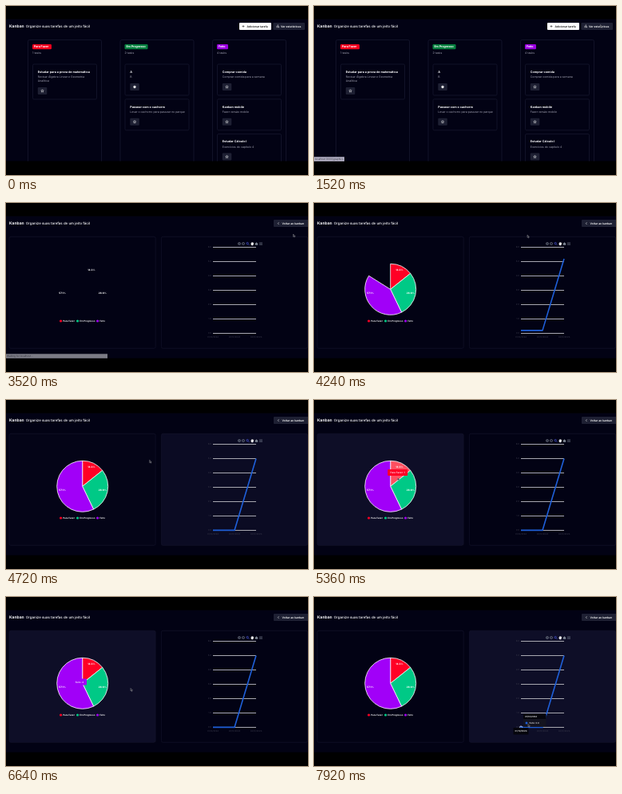
Write an HTML page that moves like this. It is 378x212 px and loops after 8 s.

```html
<!DOCTYPE html>
<html lang="pt">
<head>
<meta charset="utf-8">
<style>
html, body { margin: 0; width: 100%; height: 100%; overflow: hidden; background: #000; }
svg { display: block; width: 100vw; height: 100vh; }
text { font-family: Inter, "Open Sans", sans-serif; white-space: pre; text-rendering: geometricPrecision; }
</style>
</head>
<body>
<svg id="stage" viewBox="0 0 378 212"></svg>
<script>
const LOOP = 8000, STEP = 80;
const BG = '#020214', LIT = '#0e0e27', EDGE = '#16172e', MUTED = '#a2a2b2', DARK = '#1e2033';
const RED = '#ff0025', GREEN = '#00c986', PURPLE = '#a100f8', BLUE = '#1f5fd8', AXIS = '#3a3a4b';
const stage = document.getElementById('stage');

function add(parent, tag, attrs = {}, content) {
  const el = document.createElementNS('http://www.w3.org/2000/svg', tag);
  set(el, attrs);
  if (content !== undefined) el.textContent = content;
  parent.append(el);
  return el;
}
function set(el, attrs) {
  for (const key in attrs) el.setAttribute(key, attrs[key]);
}
const group = parent => add(parent, 'g');
const box = (p, x, y, width, height, fill, rx = 1, more = {}) =>
  add(p, 'rect', { x, y, width, height, fill, rx, ...more });
const path = (p, d, stroke, width = 0.5, fill = 'none') =>
  add(p, 'path', { d, stroke, 'stroke-width': width, fill, 'stroke-linejoin': 'round' });
const label = (p, x, y, str, size, fill = '#fff', weight = 400, anchor = 'start') =>
  add(p, 'text', { x, y, dy: '.36em', 'font-size': size, fill, 'font-weight': weight, 'text-anchor': anchor }, str);
const show = (el, on) => set(el, { opacity: +on });

const clamp = v => Math.max(0, Math.min(1, v));
const ramp = (t, from, to) => clamp((t - from) / (to - from));
const ease = v => 0.5 - Math.cos(Math.PI * v) / 2;
const within = (t, from, to) => t >= from && t < to;

box(stage, 0, 16.5, 378, 178.2, BG, 0);
label(stage, 4, 25.4, 'Kanban', 4.95, '#fff', 700);
label(stage, 24.8, 25.5, 'Organize suas tarefas de um jeito fácil', 4.42, '#fff', 500);

// Kanban board
const board = group(stage);
box(board, 292, 21, 40, 9, '#fff');
path(board, 'M295.5 25.5h3M297 24v3', '#111');
label(board, 301.5, 25.6, 'Adicionar tarefa', 3.4, '#111', 600);
box(board, 334.5, 21, 39.5, 9, DARK);
path(board, 'M339 27.2v-2.4M340.3 27.2v-3.8M341.6 27.2v-1.7', '#fff', 0.6);
label(board, 344, 25.6, 'Ver estatísticas', 3.4, '#fff', 600);

function star(p, x, y, filled) {
  const points = Array.from({ length: 10 }, (_, i) => {
    const r = i % 2 ? 0.9 : 1.8, a = i * Math.PI / 5;
    return `${x + r * Math.sin(a)} ${y - r * Math.cos(a)}`;
  });
  path(p, `M${points.join('L')}Z`, '#fff', 0.5, filled ? '#fff' : 'none');
}
function task(x, y, title, lines, starred) {
  const extra = (lines.length - 1) * 5;
  box(board, x, y, 80, 39 + extra, 'none', 1.5, { stroke: EDGE, 'stroke-width': 0.8 });
  label(board, x + 6.3, y + 9.4, title, 3.72, '#fff', 700);
  lines.forEach((line, i) => label(board, x + 6.3, y + 15.9 + i * 5, line, 3.5, MUTED));
  box(board, x + 6.3, y + 24 + extra, 11.5, 9, DARK);
  star(board, x + 12, y + 28.6 + extra, starred);
}
function column(x, name, color, width, count, tasks) {
  box(board, x, 42.5, 92, 170, 'none', 2, { stroke: EDGE, 'stroke-width': 0.8 });
  box(board, x + 5.5, 48, width, 6.2, color, 1.2);
  label(board, x + 7.4, 51.2, name, 3.6, '#fff', 700);
  label(board, x + 5.5, 58.3, `${count} tasks`, 3.5, MUTED);
  tasks.forEach((args, i) => task(x + 6, 73 + i * 43.8, ...args));
}
column(27.5, 'Para Fazer', '#f5001d', 24, 1, [
  ['Estudar para a prova de matemática', ['Revisar Álgebra Linear e Geometria', 'Analítica']]]);
column(143, 'Em Progresso', '#06803f', 29, 2, [
  ['A', ['B'], true],
  ['Passear com o cachorro', ['Levar o cachorro para passear no parque']]]);
column(258.5, 'Feito', '#9a00e0', 14, 4, [
  ['Comprar comida', ['Comprar comida para a semana']],
  ['Kanban mobile', ['Fazer versão mobile']],
  ['Estudar Cálculo I', ['Exercícios do capítulo 4']]]);
box(board, 0, 194.7, 378, 18, '#000', 0);

// Statistics page
const stats = group(stage);
box(stats, 335, 21, 44, 9, DARK);
path(stats, 'M341.6 24.2l-1.3 1.4 1.3 1.4', '#fff');
label(stats, 345.5, 25.6, 'Voltar ao kanban', 3.4, '#fff', 600);
const card = x => box(stats, x, 42.3, 183.2, 140, LIT, 2, { stroke: EDGE, 'stroke-width': 0.6 });
const leftCard = card(4), rightCard = card(194.4);

const CX = 95.7, CY = 108.3, R = 32;
const slices = [
  { name: 'Para Fazer', value: 1, color: RED, hover: '#ff4f60', dot: 68.6, width: 25 },
  { name: 'Em Progresso', value: 2, color: GREEN, hover: '#45dba6', dot: 89.6, width: 30 },
  { name: 'Feito', value: 4, color: PURPLE, hover: '#b945ff', dot: 114.6, width: 18 }];
const total = 7;
for (const s of slices) s.el = path(stats, '', '#fff', 0.8, s.color);
let sum = 0;
for (const s of slices) {
  const a = (sum + s.value / 2) / total * 2 * Math.PI;
  s.from = sum / total;
  sum += s.value;
  s.to = sum / total;
  label(stats, CX + 25.8 * Math.sin(a), CY - 25.8 * Math.cos(a) - 0.8,
    (s.value / total * 100).toFixed(1) + '%', 3.1, '#fff', 700, 'middle');
  add(stats, 'circle', { cx: s.dot, cy: 148, r: 1.6, fill: s.color });
  label(stats, s.dot + 2.6, 148, s.name, 2.9, '#fff', 600);
}
function sector(from, to) {
  if (to - from < 0.001) return '';
  const at = f => `${CX + R * Math.sin(f * 2 * Math.PI)} ${CY - R * Math.cos(f * 2 * Math.PI)}`;
  return `M${CX} ${CY}L${at(from)}A${R} ${R} 0 ${+(to - from > 0.5)} 1 ${at(to)}Z`;
}

for (let i = 0; i < 7; i++) {
  const y = 55.5 + i * 18;
  path(stats, `M259 ${y}H313`, '#a8a8b0', 1);
  label(stats, 257, y - 0.8, `${6 - i}.0`, 2.9, AXIS, 400, 'end');
}
const pointX = [259, 286, 313], dates = ['01/10/2024', '02/10/2024', '03/10/2024'];
dates.forEach((d, i) => label(stats, pointX[i], 168.4, d, 2.7, AXIS, 400, 'middle'));
for (const x of [292, 297])
  add(stats, 'circle', { cx: x, cy: 51, r: 1.6, fill: 'none', stroke: '#8b93a0', 'stroke-width': 0.5 });
path(stats, 'M290.9 51h2.2M292 49.9v2.2M295.9 51h2.2', '#8b93a0', 0.4);
add(stats, 'circle', { cx: 302.2, cy: 50.6, r: 1.2, fill: 'none', stroke: '#4a56d8', 'stroke-width': 0.7 });
path(stats, 'M303.1 51.6l1.3 1.3', '#4a56d8', 0.7);
path(stats, 'M306.7 50.8l.8 2h1.6l.5-3M307.6 51v-1.6M308.4 51v-1.8', '#fff', 0.8, '#fff');
path(stats, 'M312 51l1.5-1.4 1.5 1.4v1.5h-3Z', '#7f8794', 0.5, '#7f8794');
path(stats, 'M317 49.9h4M317 51.1h4M317 52.3h4', '#7f8794', 0.5);
const line = path(stats, '', BLUE, 1.6);

const pieTip = group(stats);
const pieTipBox = box(pieTip, 0, 0, 10, 8, RED, 1);
const pieTipText = label(pieTip, 0, 4, '', 3, '#fff', 500, 'middle');

const lineTip = group(stats);
const marker = add(lineTip, 'circle', { r: 1.5, fill: BLUE, stroke: '#fff', 'stroke-width': 0.6 });
const axisTip = group(lineTip);
box(axisTip, -9.5, 164, 19, 8.6, '#05050c', 0.8);
const axisText = label(axisTip, 0, 168.3, '', 2.8, '#fff', 500, 'middle');
const valueTip = group(lineTip);
box(valueTip, 0, 0, 28.5, 16, '#141420', 0.8);
box(valueTip, 0, 0, 28.5, 6, '#05050c', 0.8);
const valueDate = label(valueTip, 2, 3, '', 2.8, '#fff', 500);
add(valueTip, 'circle', { cx: 4, cy: 11, r: 1.5, fill: BLUE });
const valueText = label(valueTip, 7.5, 11, '', 2.8, '#fff', 500);

// Browser status bar and mouse pointer
const status = group(stage);
const statusBox = box(status, 0, 189.3, 38, 5.5, '#b3b0c4', 0);
const statusText = label(status, 1, 192.1, '', 3.1, '#30303c');
const pointer = group(stage);
const arrow = path(pointer, 'M0 0v3.3l.8-.7.6 1.3.6-.3-.6-1.2h1Z', '#b8b8c0', 0.4, '#15151c');
const hand = path(pointer, 'M.6 0v2.2l-.8-.2 1 2h2.2l.4-2-2-.4V0Z', '#222', 0.3, '#fff');

const track = [
  [560, 341, 144], [960, 352, 72], [1360, 358.5, 23.5], [2320, 358.5, 23.5], [2960, 359.5, 39],
  [3520, 359.5, 39], [4240, 267, 40], [4480, 236, 60], [4800, 170, 78], [5200, 110, 94],
  [5360, 104.7, 97.5], [5680, 112, 115], [6080, 82, 122], [6400, 92, 113], [6640, 156, 114.5],
  [6880, 196, 112], [7200, 306, 104], [7520, 284, 132], [7840, 268, 159], [8000, 268, 160]];
function pointerAt(t) {
  const i = Math.max(1, track.findIndex(k => k[0] >= t));
  const [a, b] = [track[i - 1], track[i]];
  const p = ease(ramp(t, a[0], b[0]));
  return [1, 2].map(n => a[n] + (b[n] - a[n]) * p);
}

function draw(t) {
  const onStats = t >= 3200;
  show(board, !onStats);
  show(stats, onStats);

  const [mx, my] = pointerAt(t);
  const pointing = within(t, 1760, 2400);
  set(pointer, { transform: `translate(${mx} ${my})`, opacity: +(t >= 560) });
  show(arrow, !pointing);
  show(hand, pointing);

  const loading = t >= 2320;
  show(status, within(t, 1520, 3680));
  set(statusBox, { width: loading ? 127 : 38, fill: loading ? '#7c7c86' : '#b3b0c4' });
  statusText.textContent = loading ? 'Waiting for localhost...' : 'localhost:3000/graphics';
  if (!onStats) return;

  set(leftCard, { 'fill-opacity': ramp(t, 4640, 5040) - ramp(t, 6720, 7040) });
  set(rightCard, { 'fill-opacity': ramp(t, 4240, 4480) - ramp(t, 4640, 5040) + ramp(t, 6800, 7200) });

  const grow = ease(ramp(t, 3650, 4450));
  const hovered = within(t, 5120, 5520) ? 0 : within(t, 5520, 5840) ? 1 : within(t, 5840, 6480) ? 2 : -1;
  slices.forEach((s, i) => set(s.el, {
    d: sector(s.from, Math.min(s.to, grow * 0.99999)),
    fill: i === hovered ? s.hover : s.color }));

  const shift = -22 * (1 - grow), rise = 90 * clamp(grow / 0.84);
  const ys = [163.4 + shift, 163.4 + shift, 163.4 + shift - rise];
  set(line, { d: `M${pointX.map((x, i) => `${x} ${ys[i]}`).join('L')}`, opacity: +(t > 3680) });

  const tipOn = within(t, 5120, 7040);
  set(pieTip, { opacity: tipOn ? 1 - ramp(t, 6640, 7040) : 0 });
  if (tipOn) {
    const s = slices[hovered < 0 ? 2 : hovered];
    const [px, py] = pointerAt(Math.min(t, 6400));
    set(pieTip, { transform: `translate(${px} ${py - 10.5})` });
    set(pieTipBox, { x: -s.width / 2, width: s.width, fill: s.color });
    pieTipText.textContent = `${s.name}: ${s.value}`;
  }

  const point = t < 7440 ? 2 : t < 7760 ? 1 : 0;
  show(lineTip, t >= 7120);
  set(marker, { cx: pointX[point], cy: ys[point] });
  set(axisTip, { transform: `translate(${pointX[point]} 0)` });
  const tipX = pointX[point] + (point === 2 ? -31.5 : 3);
  set(valueTip, { transform: `translate(${tipX} ${point === 2 ? 74 : 147})` });
  axisText.textContent = valueDate.textContent = dates[point];
  valueText.textContent = `Feito: ${point === 2 ? '5.0' : '0.0'}`;
}

function frame() {
  draw(Math.floor(performance.now() % LOOP / STEP) * STEP);
  requestAnimationFrame(frame);
}
frame();
</script>
</body>
</html>
```
